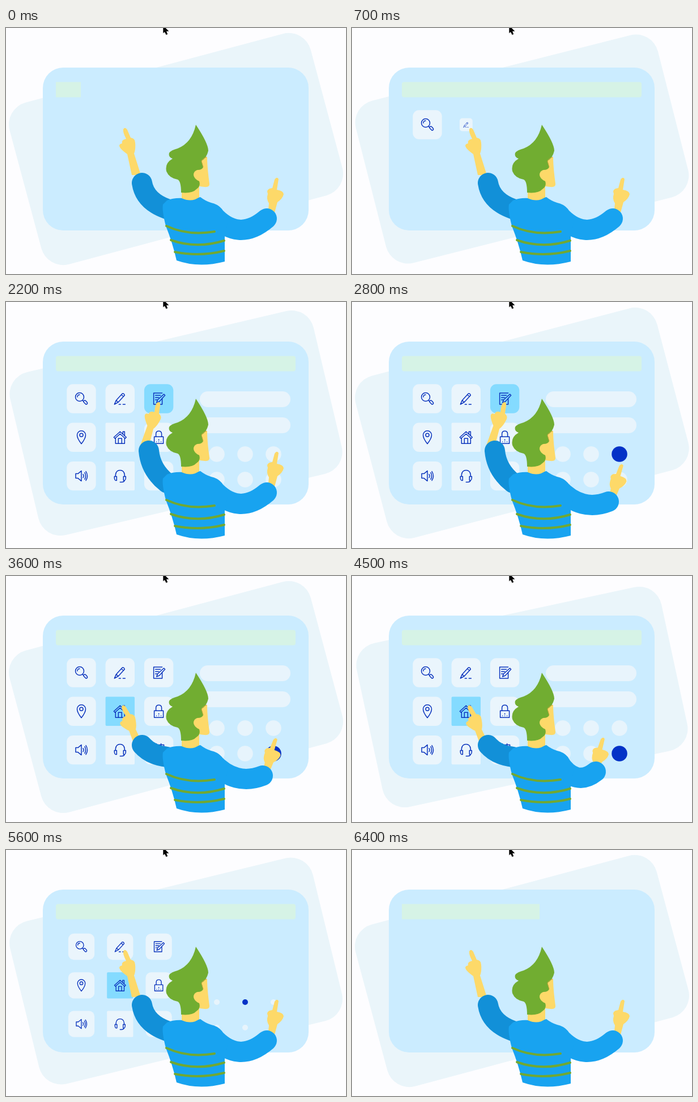
Write an HTML page that moves like this. It is 600 px wide and 435 px high and loops after 6.5 s.

```html
<!DOCTYPE html>
<html>
<head>
<meta charset="utf-8">
<style>
  html, body { margin: 0; width: 100%; height: 100%; overflow: hidden; background: #fdfdff; }
  svg { display: block; width: 600px; height: 435px; }
  .icon { fill: none; stroke: #0b34bd; stroke-width: 1.5; stroke-linecap: round; stroke-linejoin: round; }
  .skin { fill: #fdd969; }
  .sleeve { fill: none; stroke-width: 36; stroke-linecap: round; }
  .stripe { fill: none; stroke: #71a832; stroke-width: 4; stroke-linecap: round; }
</style>
</head>
<body>
<svg viewBox="0 0 600 435">
  <rect id="panel" x="25" y="66" width="550" height="296" rx="40" fill="#eaf5fa"/>
  <rect x="65" y="70" width="469" height="288" rx="36" fill="#cbecff"/>
  <rect id="bar" x="88" y="95.5" height="27" fill="#d6f3e6"/>
  <g id="fields" fill="#e8f4fc"></g>
  <g id="dots"></g>
  <g id="buttons"></g>

  <path id="leftHand" class="skin" d="M207 179Q210 174 214 180L220 194Q228 195 228 203Q229 215 226 222L238 260H222L214 223Q200 213 200 208Q200 205 205 204Q203 198 212 196Q206 185 207 179Z"/>
  <path id="leftSleeve" class="sleeve" stroke="#1290d8"/>
  <path id="rightHand" class="skin" d="M474 268Q478 262 481 267L478 286Q490 288 490 294Q488 302 479 308L473 330H462L464 310Q459 303 462 293Q459 287 465 284L470 283Z"/>
  <path id="rightSleeve" class="sleeve" stroke="#18a3f0"/>

  <path fill="#18a3f0" d="M284 305Q296 300 312 301Q326 304 343 299Q352 306 362 309Q373 311 381 320L392 340L386 368V413Q340 425 301 411Q294 380 282 350Q275 323 277 312Z"/>
  <path class="stripe" d="M283 350Q321 368 368 360"/>
  <path class="stripe" d="M291 375Q336 391 385 376"/>
  <path class="stripe" d="M298 396Q342 405 385 394"/>
  <path class="skin" d="M330 228H355Q355 246 359 275Q360 282 350 281L341 280V299Q328 309 310 301V285Z"/>
  <path fill="#71ad31" d="M335 171Q357 204 357 217Q354 230 345 235L348 246Q346 251 338 251Q331 253 331 260Q332 267 341 271Q344 280 336 285Q329 293 309 291Q309 271 303 268Q287 265 283 253Q280 239 294 231Q286 228 288 221Q291 216 303 213Q328 203 335 171Z"/>
  <path d="M354 228Q345 232 345 236L348 246" fill="none" stroke="#c6a63c"/>
  <path d="M277-5V9.500L280 7.500L282.500 12.500L285.500 11L283.500 6H288Z" stroke="#fff" stroke-width=".6"/>
</svg>
<script>
const LOOP = 6500;
const $ = id => document.getElementById(id);
const clamp = v => Math.min(1, Math.max(0, v));
const ramp = (t, from, to) => clamp((t - from) / (to - from));
const sine = u => (1 - Math.cos(Math.PI * u)) / 2;
const cubic = u => u < .5 ? 4 * u ** 3 : 1 - 4 * (1 - u) ** 3;

function add(parent, tag, attrs) {
  const el = document.createElementNS('http://www.w3.org/2000/svg', tag);
  for (const name in attrs) el.setAttribute(name, attrs[name]);
  return parent.appendChild(el);
}
const set = (el, name, value) => el.setAttribute(name, value);

// Icon outlines around the button centre
const icons = [
  'M4.500-3A7.500 7.500 0 1 1-10.500-3A7.500 7.500 0 1 1 4.500-3M-7-3Q-7-7-3-7M2 3L4 5M4 4Q6 2 8 4L10.500 7Q11 10 8 10L4 6Z',
  'M-10 10L-7 3L4-9Q7-10 8-6L-3 6ZM-7 3L-3 6M2-7L6-4M-2 10H1M5 10H9',
  'M6-1V10H-9V-10H6M-6-6H3M-6-2H0M-6 2H-3M-4 7L-2 2L9-8L11-6L1 5Z',
  'M0 11.500Q-7.500 2-7.500-4A7.500 7.500 0 0 1 7.500-4Q7.500 2 0 11.500M3-4A3 3 0 1 1-3-4A3 3 0 1 1 3-4',
  'M-11 0L0-10L11 0L9 2L0-6L-9 2ZM-8 2V11H8V2M-3 11V2H3V11M5-6V-10H8V-3',
  'M-8-1H8V11H-8ZM-5-1V-6Q-5-11 0-11Q5-11 5-6V-1M0 4V5M-4 8H-4M0 8H0M4 8H4',
  'M-10-4H-6L0-9V9L-6 4H-10ZM3-3Q5 0 3 3M6-6Q9 0 6 6M8-8Q13 0 8 8',
  'M-8 1V-2Q-7-10 0-10Q7-10 8-2V1M-10 1H-6V8H-8Q-10 7-10 4ZM10 1H6V8H8Q10 7 10 4ZM8 8Q7 11 3 11H0',
  'M-9-9H9V10H-9ZM-9-4H9M-4-11V-7M4-11V-7M-5 1H-2M3 1H6M-5 5H-2'
];

const buttons = icons.map((d, i) => {
  const g = add($('buttons'), 'g');
  const face = add(g, 'rect', {x: -25.7, y: -25.7, width: 51.4, height: 51.4, rx: i === 4 || i === 7 ? 2 : 11});
  add(g, 'path', {d, class: 'icon'});
  return {g, face, x: 133 + i % 3 * 68.3, y: 171 + Math.floor(i / 3) * 68.3};
});
const fields = [158, 204].map(y => add($('fields'), 'rect', {x: 342, y, height: 28, rx: 14}));
const dots = [0, 1, 2, 3, 4, 5].map(i =>
  add($('dots'), 'circle', {cx: 372 + i % 3 * 50, cy: i < 3 ? 269 : 314}));

// Pose: sleeve end x,y, sleeve bend x,y, fingertip x,y, hand angle
const leftHigh = [240, 274, 245, 306, 209, 178, 0];
const leftNote = [252, 263, 255, 297, 269, 178, 32];
const leftHouse = [240, 299, 256, 317, 206, 230, -8];
const rightRest = [460, 337, 410, 380, 478, 266, 0];
const rightLow = [453, 353, 405, 372, 476, 288, 7];
const rightNear = [430, 346, 395, 374, 443, 287, 4];
const leftMoves = [[1250, 1700, leftNote], [2950, 3450, leftHouse], [5000, 5500, leftHigh]];
const rightMoves = [[2200, 2650, rightLow], [4100, 4500, rightNear], [5000, 5450, rightRest]];

function poseAt(t, start, moves) {
  return moves.reduce((pose, [from, to, next]) => {
    const u = sine(ramp(t, from, to));
    return pose.map((v, i) => v + (next[i] - v) * u);
  }, start);
}

function drawArm(side, shoulder, rest, moves, t) {
  const [x, y, bx, by, tx, ty, angle] = poseAt(t, rest, moves);
  set($(side + 'Sleeve'), 'd', `M${shoulder}Q${bx} ${by} ${x} ${y}`);
  set($(side + 'Hand'), 'transform', `translate(${tx} ${ty}) rotate(${angle}) translate(${-rest[4]} ${-rest[5]})`);
}

// Last index whose start time has passed
const activeAt = (t, steps) => steps.reduce((on, [from, index]) => t >= from ? index : on, -1);

function draw(t) {
  const swing = t % (LOOP / 2);
  const dip = cubic(ramp(swing, 200, 1450)) - sine(ramp(swing, 1450, 3150));
  set($('panel'), 'transform', `rotate(${-15 + 2.9 * dip} 300 214)`);

  const barWidth = 44 + 379 * sine(ramp(t, 0, 500)) - 90 * Math.max(0, t - 6200) / 100;
  set($('bar'), 'width', barWidth);
  set($('bar'), 'rx', barWidth > 422 ? 4 : 0);

  const activeButton = activeAt(t, [[1100, 1], [1800, 2], [3500, 4]]);
  const leave = 1 - ramp(t, 5575, 5825);
  buttons.forEach(({g, face, x, y}, i) => {
    const start = 433 + 167 * i;
    set(g, 'transform', `translate(${x} ${y}) scale(${ramp(t, start, start + 225) * leave})`);
    set(face, 'fill', i === activeButton ? '#84dbff' : '#eaf5fc');
  });

  const fieldSize = ramp(t, 1750, 2050) * (1 - ramp(t, 5250, 5500));
  fields.forEach(f => set(f, 'width', 160 * fieldSize));

  const activeDot = activeAt(t, [[2600, 2], [3500, 5], [4600, 1]]);
  const dotSize = ramp(t, 1900, 2150) * (1 - ramp(t, 5450, 5685));
  dots.forEach((dot, i) => {
    set(dot, 'r', 13.8 * dotSize);
    set(dot, 'fill', i === activeDot ? '#0332c7' : '#e7f4fc');
  });

  drawArm('left', '284 320', leftHigh, leftMoves, t);
  drawArm('right', '365 330', rightRest, rightMoves, t);
}

function frame() {
  // The motion advances in tenths of a second
  draw(Math.floor(performance.now() % LOOP / 100) * 100);
  requestAnimationFrame(frame);
}
frame();
</script>
</body>
</html>
```
